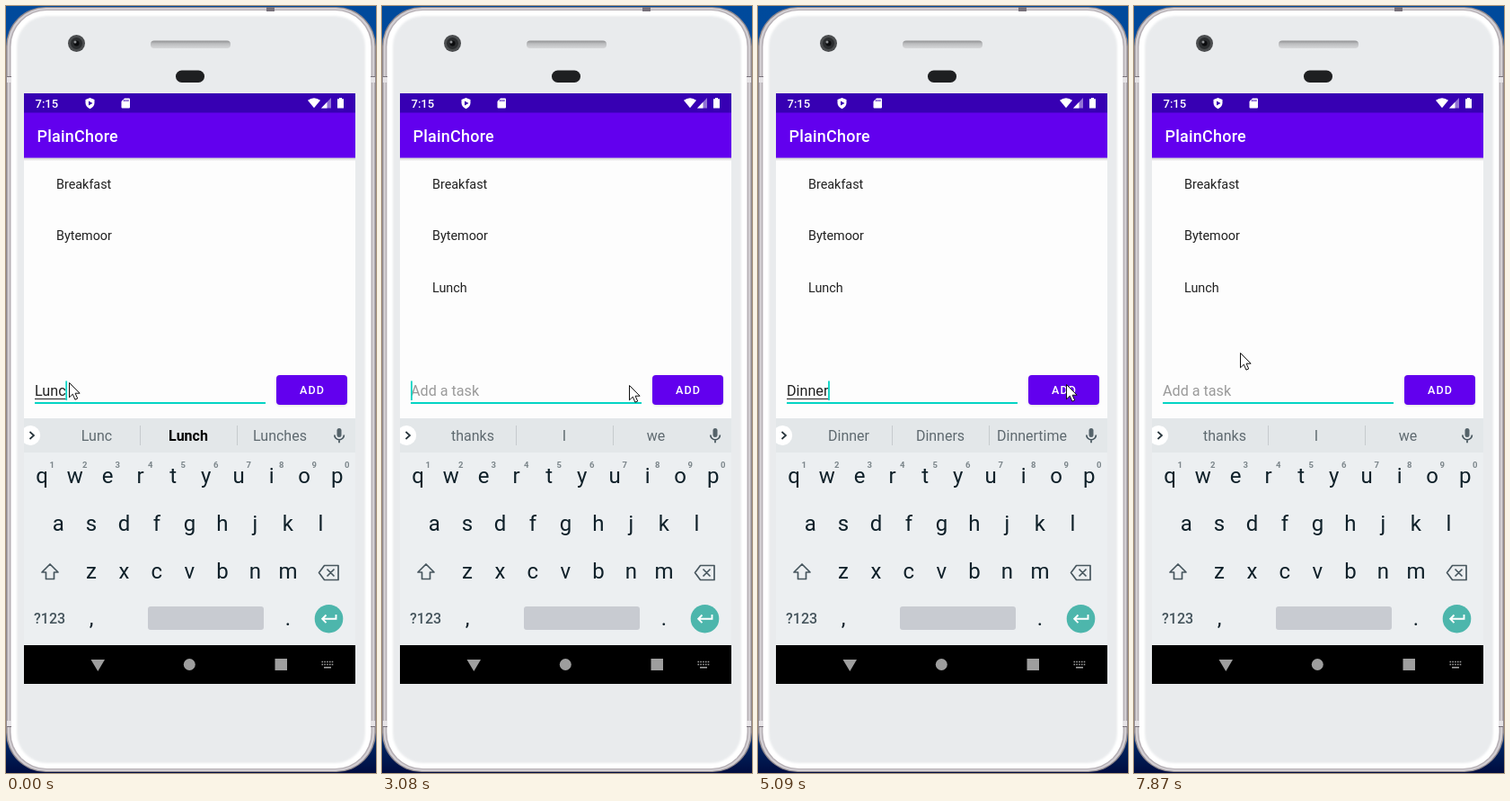
An HTML page for the animation above (8000 ms loop, 412x852 px).

```html
<!DOCTYPE html>
<html lang="en">
<head>
<meta charset="utf-8">
<title>Todo list on a phone</title>
<style>
html, body { margin: 0; width: 100%; height: 100%; overflow: hidden; background: #00408f; }
svg { display: block; width: 412px; height: 852px; font-family: Roboto, sans-serif; }
.mid { text-anchor: middle; }
.item { font-size: 14.36px; fill: #212121; }
.key { font-size: 24px; fill: #0f2029; }
.digit { font-size: 9.5px; font-weight: 700; fill: #7b858a; }
.word { font-size: 16px; fill: #5f6a70; }
.word.best { font-weight: 700; fill: #000; }
.field { font-size: 16.15px; }
.line { fill: none; stroke: #47565e; stroke-width: 1.7; }
</style>
</head>
<body>
<svg viewBox="0 0 412 852">
  <defs>
    <linearGradient id="sky" x2="0" y2="1">
      <stop offset="0" stop-color="#004a9c"/><stop offset=".94" stop-color="#00408f"/>
      <stop offset=".965" stop-color="#00245f"/><stop offset="1" stop-color="#000c40"/>
    </linearGradient>
    <linearGradient id="drop" x2="0" y2="1">
      <stop offset="0" stop-color="#cfcfcf"/><stop offset="1" stop-color="#fdfdfd"/>
    </linearGradient>
    <linearGradient id="slot" x2="0" y2="1">
      <stop offset="0" stop-color="#8f9092"/><stop offset=".4" stop-color="#bcbdbf"/><stop offset="1" stop-color="#d6d7d9"/>
    </linearGradient>
    <filter id="soft" x="-20%" y="-40%" width="140%" height="200%"><feGaussianBlur stdDeviation="1.6"/></filter>
    <filter id="edge"><feGaussianBlur stdDeviation="1.2"/></filter>
    <clipPath id="screen"><rect x="20" y="97" width="369" height="656"/></clipPath>
    <clipPath id="pill"><rect x="301" y="410" width="79" height="33" rx="4"/></clipPath>
  </defs>

  <!-- phone body -->
  <rect width="412" height="852" fill="url(#sky)"/>
  <rect x="0" y="1" width="412" height="850" rx="44" fill="#8f888d"/>
  <rect x="1.5" y="2" width="409" height="848" rx="43" fill="#d3cfd3"/>
  <rect x="4" y="4" width="404" height="844" rx="41" fill="#b5afb4"/>
  <rect x="5.5" y="5" width="401" height="842" rx="40" fill="#fff"/>
  <rect x="12" y="11" width="388" height="830" rx="34" fill="#e9ebed" filter="url(#edge)"/>
  <path d="M1 79h5v6H1zM406 79h5v6h-5zM1 794h5v6H1zM406 794h5v6h-5z" fill="#e6e3e6"/>
  <path d="M1 78h5v1H1zM406 78h5v1h-5zM1 800h5v1H1zM406 800h5v1h-5zM290 1h9v5h-9z" fill="#77717a"/>
  <circle cx="78.500" cy="41.500" r="9.500" fill="#4b4d4f"/>
  <circle cx="78.500" cy="41.500" r="6.500" fill="#2b2d2f"/>
  <circle cx="78.500" cy="41.500" r="3" fill="#0b0c0e"/>
  <circle cx="77" cy="40" r="1.500" fill="#8d9093"/>
  <rect x="161" y="38.500" width="89" height="8.500" rx="4" fill="url(#slot)"/>
  <rect x="189" y="71.500" width="32" height="13.500" rx="6.700" fill="#1e1f21"/>

  <g clip-path="url(#screen)">
    <rect x="20" y="97" width="369" height="361" fill="#fdfdfd"/>
    <rect x="20" y="97" width="369" height="22" fill="#3700b3"/>
    <rect x="20" y="118.500" width="369" height="50.300" fill="#6200ee"/>
    <rect x="20" y="168.800" width="369" height="3.500" fill="url(#drop)"/>

    <!-- status bar -->
    <g fill="#fff">
      <text x="32.500" y="113" font-size="13" font-weight="500">7:15</text>
      <path d="M93.500 102l5 2v3.500c0 3-2 5.500-5 6.700-3-1.200-5-3.700-5-6.700V104z"/>
      <path d="M92 105.500l4.500 2.500-4.500 2.500z" fill="#3700b3"/>
      <path d="M132 102.500h5q1 0 1 1v9q0 1-1 1h-7.500q-1 0-1-1v-6.500z"/>
      <path d="M131.700 104v2.200M133.800 104v2.200M135.900 104v2.200" stroke="#3700b3"/>
      <path d="M336 104.800q7-5 14 0l-7 8.500z"/>
      <path d="M362 102v11.500h-11z" opacity=".45"/>
      <path d="M357.500 106.700v6.800h-6.500z"/>
      <path d="M371 102h3v1.300h2v10.200h-7v-10.200h2z"/>
    </g>
    <text x="34.500" y="150.700" font-size="17.950" font-weight="500" letter-spacing=".25" fill="#fff">PlainChore</text>

    <!-- list -->
    <g class="item">
      <text x="56" y="203">Breakfast</text>
      <text x="56" y="260.400">Bytemoor</text>
      <text x="56" y="317.800" id="lunch">Lunch</text>
      <text x="56" y="375.200" id="dinner">Dinner</text>
    </g>

    <!-- entry row -->
    <rect x="32" y="440" width="257" height="2" fill="#03d4c4"/>
    <text class="field" x="32" y="433" id="hint" fill="#9a9a9a">Add a task</text>
    <text class="field" x="32" y="433" id="entry" fill="#212121"></text>
    <rect x="32" y="436" height="1" id="under" fill="#212121"/>
    <rect y="416.500" width="1.800" height="21.500" id="caret" fill="#03d4c4"/>
    <rect x="301.500" y="411" width="78" height="33" rx="4" fill="#000" opacity=".12" filter="url(#soft)"/>
    <rect x="301" y="414" width="79" height="32" rx="4" fill="#000" opacity=".4" filter="url(#soft)" id="lift"/>
    <rect x="301" y="410" width="79" height="33" rx="4" fill="#6200ee"/>
    <circle id="ripple" clip-path="url(#pill)" fill="#fff"/>
    <text class="mid" x="341" y="431" font-size="12.560" font-weight="500" letter-spacing="1.100" fill="#fff">ADD</text>

    <!-- keyboard -->
    <rect x="20" y="458" width="369" height="39" fill="#e3e7e9"/>
    <rect x="20" y="496" width="369" height="214" fill="#eceff1"/>
    <path d="M20 468.700A11 11 0 1 1 20 485.300z" fill="#fff"/>
    <path d="M26.500 473l4.500 4-4.500 4" class="line" style="stroke:#26343b"/>
    <path d="M149.500 466v22M257.500 466v22" stroke="#c6cbce"/>
    <g id="words"></g>
    <rect x="368.500" y="469" width="5" height="10" rx="2.500" fill="#55636a"/>
    <path d="M365.800 476.500a5.300 5.300 0 0 0 10.600 0M371 481.800v3.400" class="line" stroke-width="1.400"/>
    <g id="keys"></g>
    <path d="M49 620l9 9h-4.500v7.500h-9V629H40z" class="line" stroke-linejoin="round"/>
    <path d="M354.500 621.500h15.500v16h-15.500l-6-8zM357.500 625.500l8 8M365.500 625.500l-8 8" class="line" stroke-linejoin="round"/>
    <text x="31" y="685.700" font-size="16" font-weight="500" fill="#45545c">?123</text>
    <rect x="158" y="667" width="129" height="26" rx="3" fill="#c8cbd1"/>
    <circle cx="359.500" cy="680.700" r="15.800" fill="#4db6ac"/>
    <path d="M367.500 676v4.800h-15M356.500 676.500l-4.300 4.300 4.300 4.300" fill="none" stroke="#fff" stroke-width="1.900"/>

    <!-- navigation bar -->
    <rect x="20" y="710" width="369" height="43"/>
    <g fill="#9e9e9e">
      <path d="M94.500 726h15.500l-7.700 13z"/>
      <circle cx="204.300" cy="731.500" r="6.500"/>
      <rect x="299.500" y="725" width="13.500" height="13"/>
      <path d="M351.500 728.500h13M351.500 731.500h13" fill="none" stroke="#9e9e9e" stroke-width="1.600" stroke-dasharray="1.600 1.200"/>
      <rect x="354" y="734" width="8" height="1.600"/>
    </g>
  </g>

  <path id="mouse" d="M.5 .5v16.300l3.800-3.600 2.600 6 2.800-1.200-2.600-5.800h5z" fill="#fff" stroke="#111" stroke-linejoin="round"/>
</svg>
<script>
const LOOP = 8000;
const $ = id => document.getElementById(id);
const NS = "http://www.w3.org/2000/svg";

function addText(parent, x, y, cls, text) {
  const el = document.createElementNS(NS, "text");
  el.setAttribute("x", x);
  el.setAttribute("y", y);
  el.setAttribute("class", "mid " + cls);
  el.textContent = text;
  return $(parent).appendChild(el);
}

// Rows of keys share one pitch and are centred on the screen.
const PITCH = 36.5, ROW = 53, CENTRE = 204.4;
const keyX = (i, count) => CENTRE + (i - (count - 1) / 2) * PITCH;
["qwertyuiop", "asdfghjkl", "zxcvbnm"].forEach((row, r) =>
  [...row].forEach((c, i) => addText("keys", keyX(i, row.length), 529.6 + r * ROW, "key", c)));
[..."1234567890"].forEach((c, i) => addText("keys", keyX(i, 10) + 11.2, 512.5, "digit", c));
addText("keys", 95, 687.5, "key", ",");
addText("keys", 314, 687.5, "key", ".");
const words = [101, 203, 305].map(x => addText("words", x, 482.6, "word", ""));

// Each step changes only the named parts; press = [radius, opacity].
const start = {
  text: "Lunc", words: "Lunc|*Lunch|Lunches", caret: 1,
  mouse: [70, 418], lunch: 0, dinner: 0, press: [0, 0], lift: 0
};
const IDLE = "thanks|I|we";
const steps = [
  [370, { text: "Lunch" }],
  [510, { words: "Lunch|Lunches|Luncheon" }],
  [970, { caret: 0 }],
  [1120, { mouse: [108, 421] }],
  [1270, { mouse: [196, 425] }],
  [1400, { mouse: [290, 427] }],
  [1540, { mouse: [345, 428], caret: 1 }],
  [1690, { mouse: [353, 428] }],
  [1830, { press: [27, .24], lift: .6 }],
  [1980, { press: [47, .24], lift: 1, text: "" }],
  [2130, { press: [90, .2], lift: .6, lunch: 1 }],
  [2260, { press: [90, .08], lift: 0, words: IDLE, mouse: [340, 427] }],
  [2390, { press: [0, 0], mouse: [296, 423] }],
  [2510, { mouse: [275, 421], caret: 0 }],
  [3080, { caret: 1 }],
  [3220, { text: "D", words: "D|Do|Did" }],
  [3400, { text: "Di", words: "Di|Did|Do" }],
  [3580, { text: "Din", words: "Din|*Dinner|Dining" }],
  [3760, { text: "Dinn", words: "Dinn|*Dinner|Dinners" }],
  [3940, { text: "Dinner" }],
  [4120, { words: "Dinner|Dinners|Dinnertime" }],
  [4700, { caret: 0 }],
  [4840, { mouse: [288, 421] }],
  [4960, { mouse: [326, 420] }],
  [5090, { mouse: [343, 420], caret: 1 }],
  [5260, { press: [35, .24], lift: 1 }],
  [5380, { press: [90, .2], lift: .8, text: "", dinner: 1 }],
  [5520, { press: [90, .08], lift: 0, words: IDLE, mouse: [262, 392] }],
  [5660, { press: [0, 0], mouse: [151, 355] }],
  [5810, { mouse: [126, 372], caret: 0 }],
  [5950, { mouse: [100, 370] }],
  [6090, { mouse: [84, 366] }],
  [6380, { caret: 1 }],
  [6780, { dinner: 0 }],
  [6930, { caret: 0 }],
  [7330, { caret: 1 }],
  [7470, { mouse: [92, 350] }],
  [7600, { mouse: [106, 364] }],
  [7730, { mouse: [115, 379] }],
  [7870, { mouse: [118, 385], caret: 0 }]
];

const show = (id, on) => { $(id).style.opacity = on ? 1 : 0; };

function draw(s) {
  $("entry").textContent = s.text;
  const width = s.text ? $("entry").getComputedTextLength() : 0;
  $("under").setAttribute("width", width);
  $("caret").setAttribute("x", 32 + Math.max(0, width - .3));
  show("hint", !s.text);
  show("caret", s.caret);
  show("lunch", s.lunch);
  show("dinner", s.dinner);
  s.words.split("|").forEach((w, i) => {
    words[i].textContent = w.replace("*", "");
    words[i].classList.toggle("best", w[0] === "*");
  });
  const [x, y] = s.mouse, ripple = $("ripple");
  $("mouse").setAttribute("transform", `translate(${x} ${y})`);
  if (s.press[0]) {
    ripple.setAttribute("cx", x);
    ripple.setAttribute("cy", y);
  }
  ripple.setAttribute("r", s.press[0]);
  ripple.setAttribute("opacity", s.press[1]);
  $("lift").setAttribute("opacity", s.lift * .4);
}

let shown = -1;
const origin = performance.now();
function tick() {
  const t = Math.max(0, performance.now() - origin) % LOOP;
  const past = steps.filter(([at]) => at <= t);
  if (past.length !== shown) {
    shown = past.length;
    draw(Object.assign({}, start, ...past.map(p => p[1])));
  }
  requestAnimationFrame(tick);
}
tick();
</script>
</body>
</html>
```
